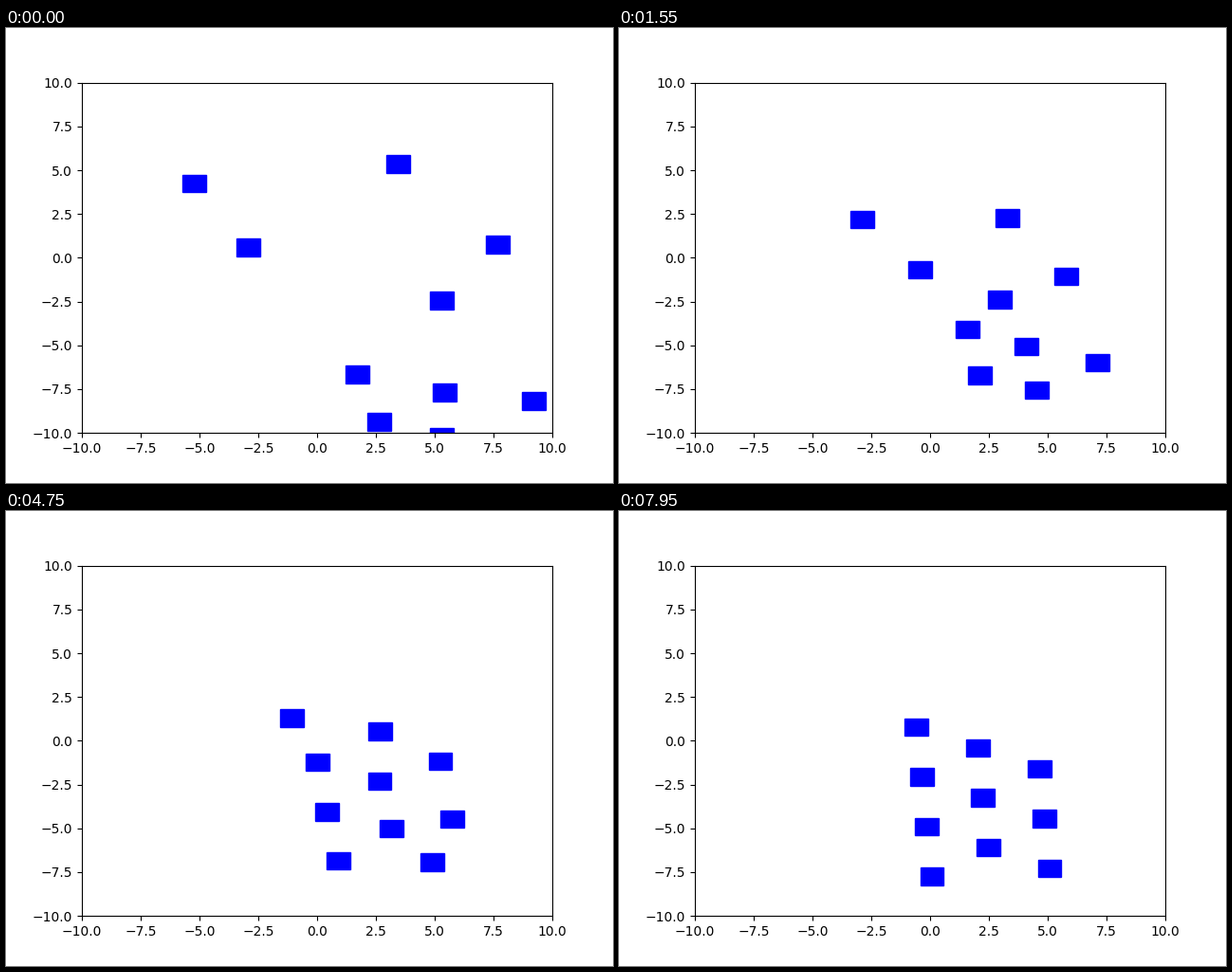
Animation of 640 by 480 pixels, one loop 8 s. Source, as a matplotlib script:

```python
import numpy as np
import matplotlib.pyplot as plt
from matplotlib.animation import FuncAnimation
from matplotlib.patches import Rectangle

FRAMES, INTERVAL = 160, 50
SIZE = 1.0
SPEED = 2.0                # units per second while flying in
CONTACT, SETTLED = 2.2, 5.95   # seconds

# Where the agents begin, and where they first touch
START = np.array([
    (-5.22, 4.25), (-2.92, 0.59), (1.71, -6.66), (2.64, -9.37),
    (3.45, 5.34), (5.30, -2.44), (5.42, -7.69),
    (7.68, 0.74), (9.21, -8.18), (5.30, -10.21)])
MEET = np.array([
    (-1.92, 1.35), (0.18, -0.82), (0.83, -3.63), (1.59, -6.34),
    (3.17, 1.08), (2.88, -1.74), (3.69, -4.28),
    (5.67, -1.20), (6.51, -5.04), (4.42, -7.09)])

# Final formation: a slanted grid with columns of 4, 3 and 3
CELLS = np.array([(col, row) for col, count in enumerate((4, 3, 3))
                  for row in range(count)])
GRID = np.array([-0.35, 1.25]) + CELLS @ np.array([(2.61, -1.19),
                                                  (0.22, -2.84)])
DRIFT = np.array([-0.113, -0.233])


def length(v):
    return np.linalg.norm(v, axis=1, keepdims=True)


to_center = START.mean(axis=0) - START
LAUNCH = SPEED * to_center / length(to_center)
# Braking exponent that makes every glide begin at SPEED
BRAKE = np.maximum(1, SPEED * CONTACT / length(MEET - START))


def fly(t):
    """Head for the common centre, bending towards the contact point."""
    u = t / CONTACT
    straight = START + LAUNCH * t
    glide = MEET + (START - MEET) * (1 - u) ** BRAKE
    return (1 - u) * straight + u * glide


def creep(t):
    """Slide slowly from the contact points into the grid."""
    u = (t - CONTACT) / (SETTLED - CONTACT)
    return MEET + (GRID - MEET) * u ** 1.6


def centers(t):
    if t < CONTACT:
        return fly(t)
    if t < SETTLED:
        return creep(t)
    return GRID + DRIFT * (t - SETTLED)


fig, ax = plt.subplots(figsize=(6.4, 4.8), dpi=100)
ax.set_xlim(-10, 10)
ax.set_ylim(-10, 10)
boxes = [ax.add_patch(Rectangle((0, 0), SIZE, SIZE, color="blue"))
         for _ in START]


def update(frame):
    for box, center in zip(boxes, centers(frame * INTERVAL / 1000)):
        box.set_xy(center - SIZE / 2)
    return boxes


anim = FuncAnimation(fig, update, frames=FRAMES, interval=INTERVAL,
                     repeat=True, repeat_delay=0)
plt.show()
```
